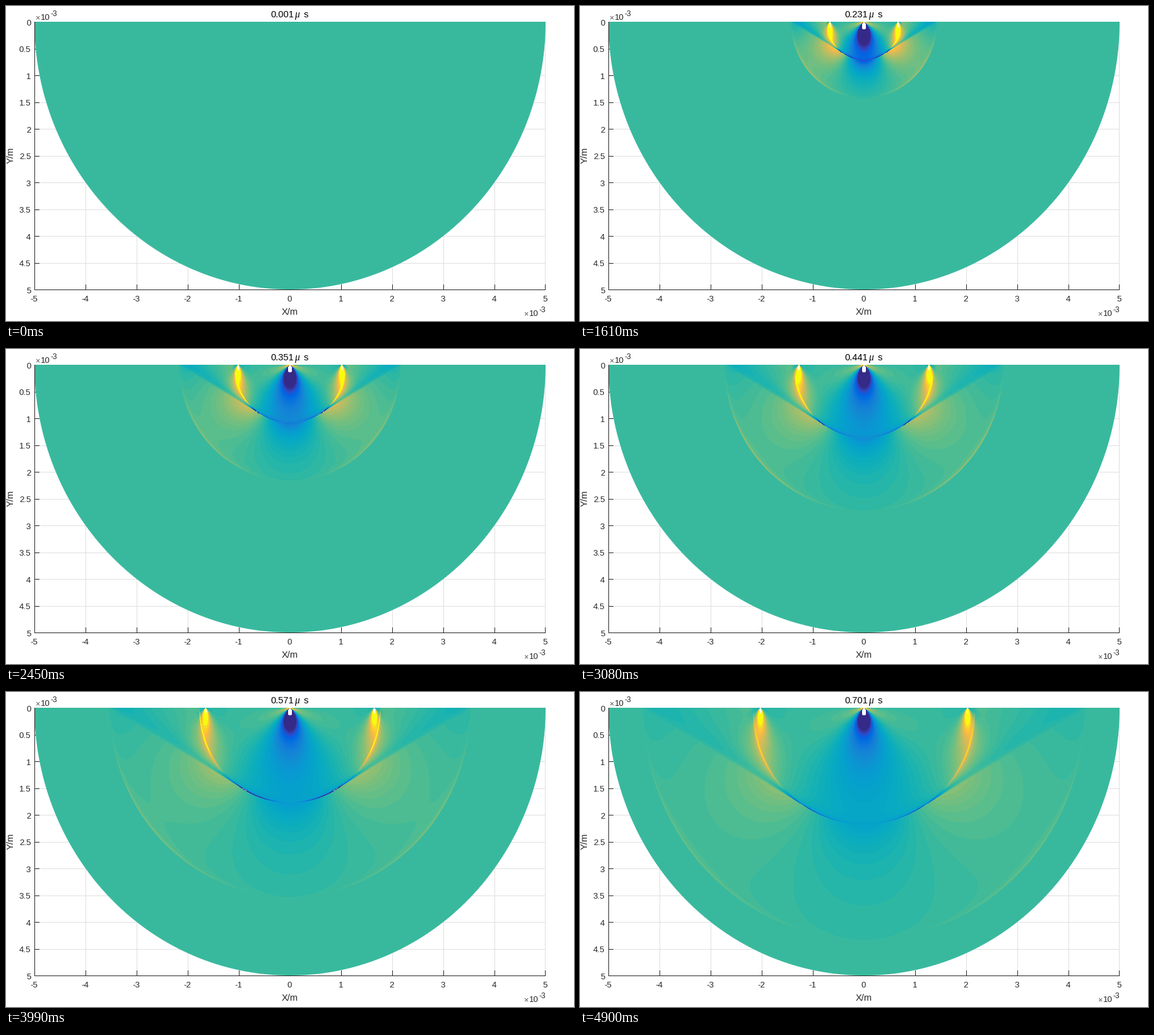
A matplotlib script that plays this animation: 900 px wide and 500 px high, repeating every 4970 ms.

```python
import numpy as np
import matplotlib.pyplot as plt
from matplotlib.animation import FuncAnimation
from matplotlib.colors import LinearSegmentedColormap

W, H, DPI = 900, 500, 100
LEFT, TOP, RIGHT, BOTTOM = 45, 25, 855, 450
SX, SY = 81, 85              # pixels per millimetre
FRAMES, STEP = 71, 70

A, B = 1 / 6.173, 1 / 3.101  # P and S slowness, us/mm
DR = 0.01                    # radial grid step, mm
COLOR_LIM, CLIP_LIM = 1.63, 4.6
INK, GRID = "#262626", "#dfdfdf"

STOPS = {
    0: "#352a87", 3: "#353dad", 5: "#2c4ac7", 6: "#2053d4", 7: "#0f5cdd",
    8: "#0363e1", 10: "#046de0", 14: "#127dd8", 16: "#1485d4", 18: "#108ed2",
    20: "#0998d1", 22: "#06a0cd", 24: "#06a7c6", 26: "#0aacbe", 28: "#15b1b4",
    30: "#25b5a9", 32: "#38b99e", 34: "#4dbc92", 36: "#65be86", 39: "#87bf77",
    43: "#aebe67", 47: "#d1bb59", 51: "#f1b94a", 52: "#f8bb44", 53: "#fdbe3d",
    54: "#ffc337", 56: "#fcce2e", 59: "#f5de21", 61: "#f5eb18", 63: "#f9fb0e",
}
cmap = LinearSegmentedColormap.from_list(
    "field", [(i / 63, c) for i, c in STOPS.items()], N=64)

# Right half of the domain; the field is even in x.
gx, gy = np.meshgrid((np.arange(405) + 0.5) / SX, (np.arange(425) + 0.5) / SY)
radius = np.hypot(gx, gy)
sin_t, cos_t = gx / radius, gy / radius
r_in = np.maximum(np.floor(radius / DR), 1) * DR
blend = np.clip((radius - r_in) / DR, 0, 1)
cover = np.clip((5 - radius) * 83 + 0.5, 0, 1)


def rayleigh(p, al, be):
    return (B**2 - 2 * p**2)**2 + 4 * p**2 * al * be


def p_wave(t, r, s, c):
    q = np.sqrt(t**2 - (A * r)**2)
    p = (t * s + 1j * c * q) / r
    al = (t * c - 1j * s * q) / r
    be = np.sqrt(B**2 - p**2)
    return (2 * p**2 * al**2 * be / rayleigh(p, al, be)).real / q


def s_wave(t, r, s, c):
    q = np.sqrt(t**2 - (B * r)**2)
    p = (t * s + 1j * c * q) / r
    be = (t * c - 1j * s * q) / r
    al = np.sqrt(A**2 - p**2)
    return -(p**2 * (B**2 - 2 * p**2) * be / rayleigh(p, al, be)).real / q


def head_wave(t, r, s, c):
    q = np.sqrt((B * r)**2 - t**2)
    p = (t * s - c * q) / r
    be = (t * c + s * q) / r
    al = -1j * np.sqrt(np.maximum(p**2 - A**2, 0))
    return -(p**2 * (B**2 - 2 * p**2) / rayleigh(p, al, be)).imag * be / q


def displacement(t, r):
    """Vertical displacement of a half-space under a step shear dipole."""
    head_start = r * (A * sin_t + np.sqrt(B**2 - A**2) * cos_t)
    parts = (
        (p_wave, A * r < t),
        (s_wave, B * r < t),
        (head_wave, (B * r > t) & (sin_t > A / B) & (head_start < t)),
    )
    u = np.zeros_like(r)
    for wave, where in parts:
        if where.any():
            u[where] += wave(t, r[where], sin_t[where], cos_t[where])
    return u


def render(t):
    # Linear between the radial grid points, as on a shaded mesh.
    u = (1 - blend) * displacement(t, r_in) + blend * displacement(t, r_in + DR)
    level = np.floor((u / COLOR_LIM + 1) * 32)
    rgba = cmap(np.clip(level, 0, 63).astype(int))
    rgba[np.abs(u) > CLIP_LIM] = 1
    rgba[..., 3] = cover
    return np.concatenate([rgba[:, ::-1], rgba], axis=1)


fig = plt.figure(figsize=(W / DPI, H / DPI), dpi=DPI, facecolor="white")
ax = fig.add_axes([0, 0, 1, 1])
PT = 72 / DPI


def label(x, y, text, px=13.33, ha="center", va="baseline", color=INK,
          font="Liberation Sans", **kw):
    return ax.text(x, y, text, fontsize=px * PT, ha=ha, va=va, color=color,
                   family=font, zorder=5, **kw)


def line(x0, y0, x1, y1, color, z):
    ax.plot([x0, x1], [y0, y1], color=color, lw=PT, zorder=z,
            solid_capstyle="butt", snap=False)


def power(x, y):
    label(x, y, "×", 12.5, "left", color="#555555")
    label(x + 9.2, y, "10", ha="left")
    label(x + 24.3, y - 6, "-3", 12, "left")


for k in range(11):
    x = min(LEFT + SX * k, RIGHT - 1) + 0.5
    y = np.floor(TOP + 0.5 + 42.5 * k) + 0.5
    line(x, TOP, x, BOTTOM, GRID, 1)
    line(LEFT, y, RIGHT, y, GRID, 1)
    line(x, BOTTOM - 8, x, BOTTOM, INK, 2)
    line(LEFT, y, LEFT + 8, y, INK, 2)
    label(LEFT + SX * k - 0.5, 469, str(k - 5))
    label(39.5, TOP + 42.5 * k + 5.8, f"{k / 2:g}", ha="right")

line(LEFT + 0.5, TOP, LEFT + 0.5, BOTTOM + 1, INK, 4)
line(LEFT, BOTTOM + 0.5, RIGHT, BOTTOM + 0.5, INK, 4)
label(450, 490, "X/m", 14.67)
label(8, 237, "Y/m", 14.67, va="center", rotation=90)
power(46, 22)
power(820, 492)

clock = label(419.5, 18, "", 14.67, "left", color="black")
label(457, 18, "μ", 15.5, "left", color="black", font="Liberation Serif",
      style="italic")
label(472, 18, "s", 14.67, "left", color="black")

picture = ax.imshow(np.zeros((BOTTOM - TOP, RIGHT - LEFT, 4)),
                    extent=(LEFT, RIGHT, BOTTOM, TOP), aspect="auto",
                    interpolation="nearest", zorder=3)
ax.set_xlim(0, W)
ax.set_ylim(H, 0)
ax.axis("off")


def update(i):
    t = 0.001 + 0.01 * i
    picture.set_data(render(t))
    clock.set_text(f"{t:.3f}")
    return picture, clock


anim = FuncAnimation(fig, update, frames=FRAMES, interval=STEP, repeat=True,
                     repeat_delay=0)
plt.show()
```
